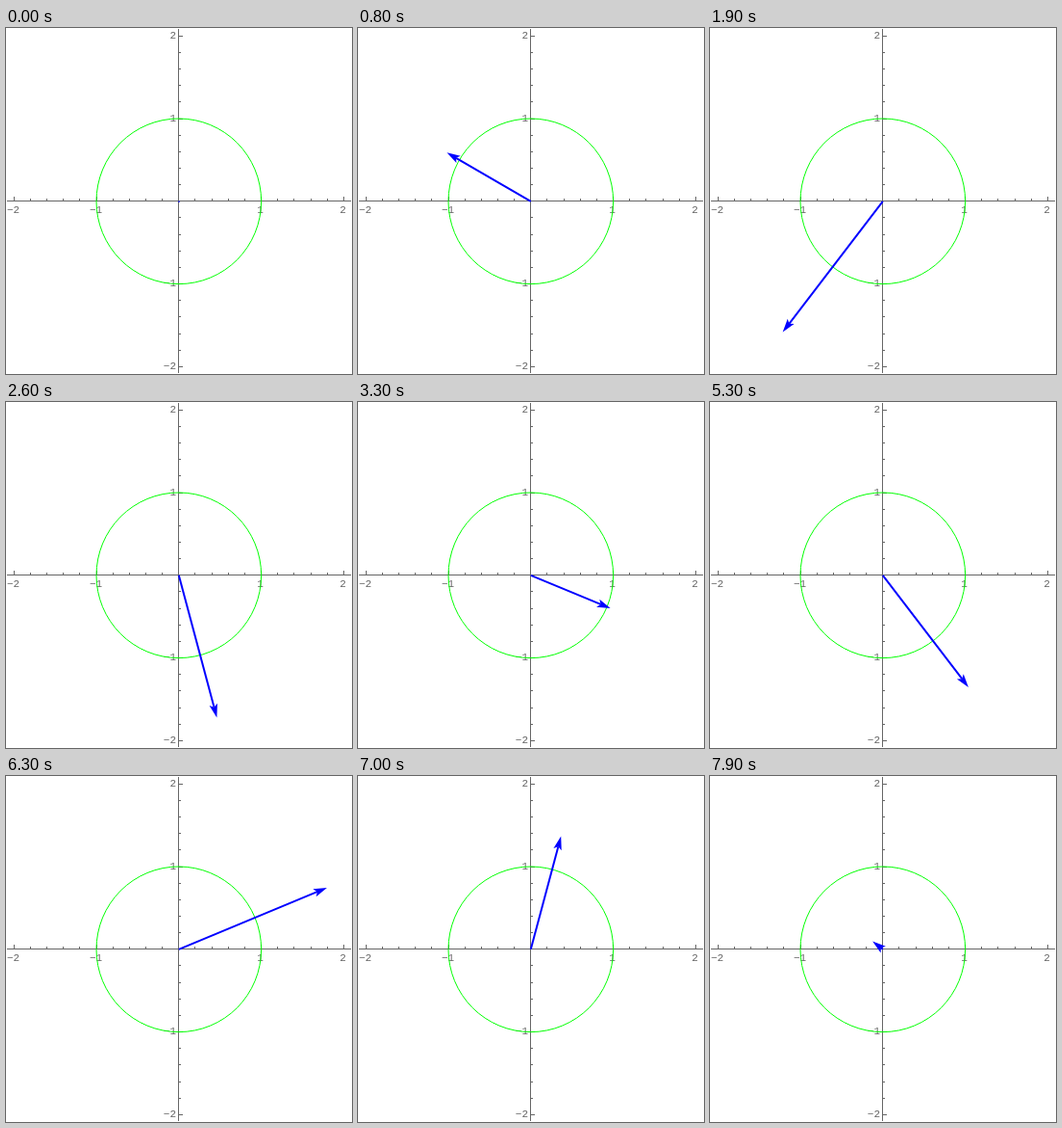
Animation, 360 px wide and 359 px high, one loop 8000 ms. Source, as an HTML page with a canvas:

```html
<!DOCTYPE html>
<html>
<head>
<meta charset="utf-8">
<style>
html, body { margin: 0; width: 100%; height: 100%; overflow: hidden; background: #fff; }
canvas { display: block; }
</style>
</head>
<body>
<canvas id="stage" width="360" height="359"></canvas>
<script>
const ctx = document.getElementById('stage').getContext('2d');
const ORIGIN = 179.8, UNIT = 85.8, AXIS = 179;
const STEP = 100, STEPS = 80;
const HEAD = 14, HALF = 4.3, NOTCH = 11;
const rad = deg => deg * Math.PI / 180;

function drawAxes() {
  ctx.fillStyle = '#666';
  ctx.fillRect(1, AXIS, 358, 1);
  ctx.fillRect(AXIS, 1, 1, 357);
  ctx.font = '11px "Liberation Mono", monospace';
  for (let i = -10; i <= 10; i++) {
    if (!i) continue;
    const major = i % 5 === 0, len = major ? 4 : 2;
    const x = Math.floor(ORIGIN + i / 5 * UNIT);
    const y = Math.floor(ORIGIN - i / 5 * UNIT);
    ctx.fillRect(x, AXIS - len, 1, len);
    ctx.fillRect(AXIS + 1, y, len, 1);
    if (!major) continue;
    const label = String(i / 5).replace('-', '\u2212');
    ctx.textAlign = 'center';
    ctx.fillText(label, x - 0.5, 192);
    ctx.textAlign = 'right';
    ctx.fillText(label, 177, y + 3);
  }
}

function drawCircle() {
  ctx.strokeStyle = '#0f0';
  ctx.lineWidth = 1;
  ctx.beginPath();
  ctx.arc(ORIGIN, ORIGIN, UNIT, 0, 2 * Math.PI);
  ctx.stroke();
}

// The radius is signed: a negative one flips the arrow through the origin.
function drawArrow(k) {
  const r = 2 * Math.sin(rad(4.5 * k)) * UNIT;
  const len = Math.abs(r);
  ctx.fillStyle = ctx.strokeStyle = '#00f';
  if (len < 0.01) {
    ctx.fillRect(179.3, 179.5, 1.4, 1.4);
    return;
  }
  ctx.save();
  ctx.translate(ORIGIN, ORIGIN);
  ctx.rotate(-rad(90 + 7.5 * k + (r < 0 ? 180 : 0)));
  ctx.lineWidth = 2;
  ctx.beginPath();
  ctx.moveTo(0, 0);
  ctx.lineTo(Math.max(0, len - NOTCH), 0);
  ctx.stroke();
  ctx.beginPath();
  ctx.moveTo(len, 0);
  ctx.lineTo(len - HEAD, HALF);
  ctx.lineTo(len - NOTCH, 0);
  ctx.lineTo(len - HEAD, -HALF);
  ctx.fill();
  ctx.restore();
}

function frame() {
  const k = Math.floor(performance.now() / STEP) % STEPS;
  ctx.clearRect(0, 0, 360, 359);
  drawAxes();
  drawCircle();
  drawArrow(k);
  requestAnimationFrame(frame);
}
frame();
</script>
</body>
</html>
```
